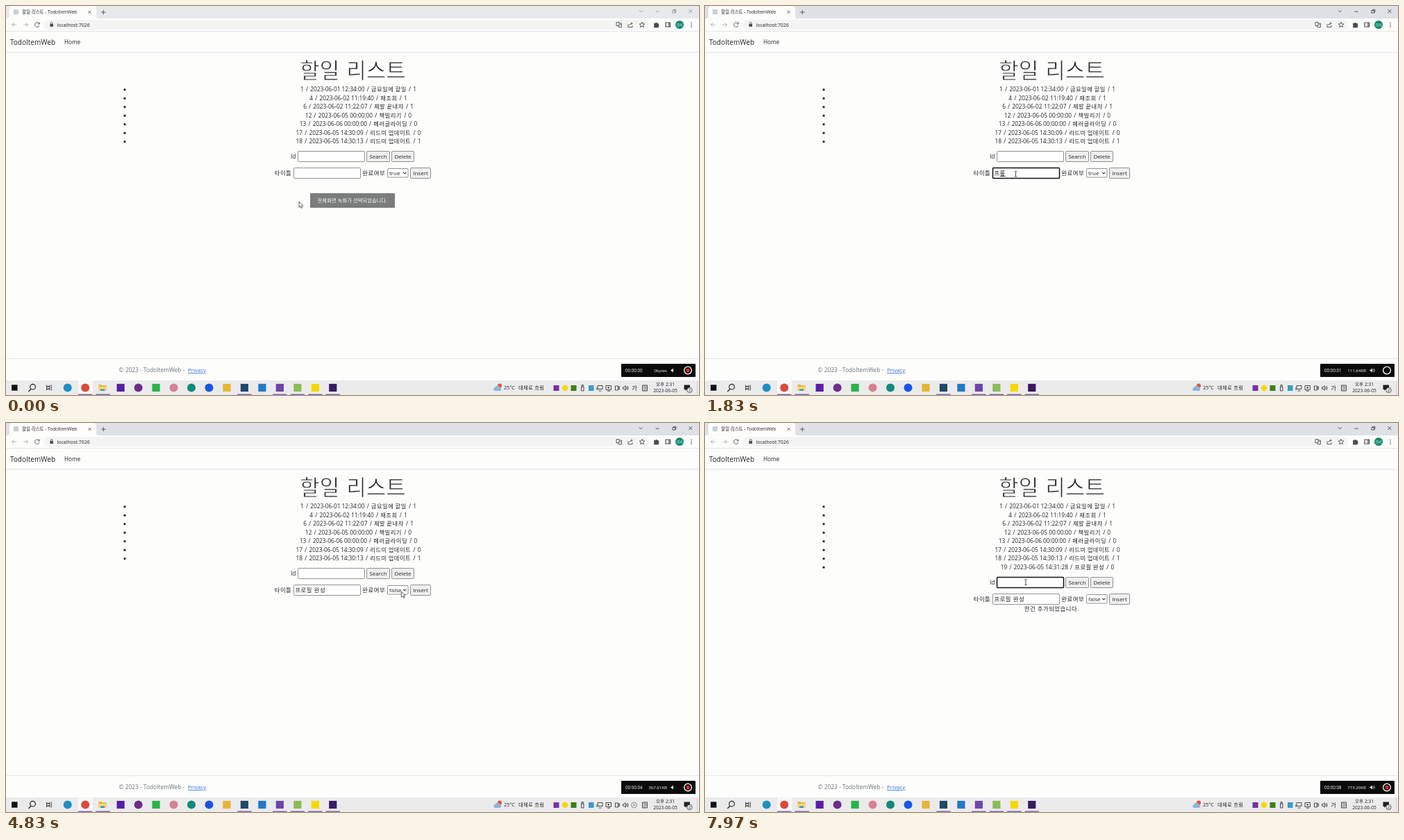
An HTML page for the animation above (8 s loop, 998 by 561 pixels).

```html
<!DOCTYPE html>
<html lang="ko">
<head>
<meta charset="utf-8">
<title>할일 리스트</title>
<style>
html, body { margin: 0; width: 100%; height: 100%; overflow: hidden; background: #fdfdfb; }
svg { display: block; width: 998px; height: 561px; }
text { font-family: "Open Sans", "Noto Sans CJK KR", sans-serif; fill: #212529; white-space: pre; }
.ko { font-size: 8.4px; letter-spacing: .5px; }
.row { font-size: 8.3px; text-anchor: middle; }
.row .hangul { letter-spacing: .5px; }
.row .slash { word-spacing: 1px; }
.ui { font-size: 8px; }
.mid { text-anchor: middle; }
/* a background-coloured outline thins the heading strokes */
.heading { font-size: 31px; font-weight: 300; word-spacing: 2px; stroke: #fdfdfb; stroke-width: .8; }
.field { fill: #fff; stroke: #767676; stroke-width: .8; }
.button { fill: #efefef; stroke: #767676; stroke-width: .8; }
.focus .field { stroke: #101010; stroke-width: 1.5; }
.line { fill: none; stroke: #4a4d51; stroke-width: .9; }
.caption { fill: none; stroke: #333; stroke-width: .8; }
.white { fill: #fff; }
</style>
</head>
<body>
<svg viewBox="0 0 998 561">
  <defs>
    <clipPath id="partial"><rect width="998" height="249"/></clipPath>
  </defs>
  <rect width="998" height="561" fill="#fdfdfb"/>

  <!-- browser window -->
  <rect id="strip" width="998" height="18"/>
  <path d="M2 18Q5 18 5 14V4Q5 0 9 0H126Q130 0 130 4V14Q130 18 133 18Z" fill="#fdfdfb"/>
  <rect x="11" y="5" width="7" height="7" fill="#c5d0d8"/>
  <text x="23" y="11.2" font-size="6.5">할일 리스트 - TodoItemWeb</text>
  <path class="line" d="M118.5 6.8l4 4m0-4l-4 4M137 9h6.5m-3.25-3.25v6.5"/>
  <g id="captions" class="caption">
    <path d="M911.8 6.2l2.4 2.4 2.4-2.4M935.5 8h5M960 6.5h3.6v3.6h-3.6zM961.2 6.5v-1.3h3.6v3.6h-1.2M983.3 5l5 5m0-5l-5 5"/>
  </g>
  <rect x="54" y="20" width="872" height="14" rx="7" fill="#f3f4f3"/>
  <path class="line" stroke-opacity=".45" d="M15 27H8.5m3-3l-3 3 3 3M25 27h6.5m-3-3l3 3-3 3"/>
  <path class="line" d="M47.6 25.2A3.3 3.3 0 1 0 48 28M48.2 23.3v2.6h-2.6"/>
  <rect x="63.4" y="26" width="4.6" height="3.8" fill="#4a4d51"/>
  <path class="line" d="M64.4 26v-1.2a1.3 1.3 0 0 1 2.6 0V26"/>
  <text x="73.5" y="29.6" font-size="7">localhost:7026</text>
  <g class="line">
    <path d="M879 23.5h4v5h-4zM883 25h3.4v5.6h-4.2l-1-2M884 27h1.6M896 26v4.5h6V28M898 28q0-3 4-3m-1.7-1.7l1.9 1.7-1.9 1.7"/>
    <path d="M916 23.2l1.1 2.6 2.8.2-2.2 1.8.7 2.8-2.4-1.5-2.4 1.5.7-2.8-2.2-1.8 2.8-.2z"/>
    <path d="M950 24h6.5v6H950zM954.8 24v6" stroke-width="1.2"/>
  </g>
  <path d="M933 25h2.2a1.3 1.3 0 0 1 2.6 0h2v2a1.3 1.3 0 0 1 0 2.4v1.8H933v-2a1.2 1.2 0 0 0 0-2z" fill="#4a4d51"/>
  <circle cx="970" cy="27" r="6" fill="#128a6c"/>
  <text class="white mid" x="970" y="28.7" font-size="4.4">민서</text>
  <g fill="#4a4d51"><circle cx="987" cy="24.5" r=".8"/><circle cx="987" cy="27.2" r=".8"/><circle cx="987" cy="29.9" r=".8"/></g>
  <path d="M0 36.5H998" stroke="#e3e4e6"/>

  <!-- page -->
  <path d="M0 66.5H998" stroke="#e6e8ea"/><path d="M0 67.8H998" stroke="#f6f6f5" stroke-width="1.6"/>
  <text x="6" y="55.5" font-size="10">TodoItemWeb</text>
  <text x="84" y="54.6" font-size="8.2">Home</text>
  <text class="heading mid" x="499.5" y="103.8">할일 리스트</text>
  <g id="content">
    <g id="list"></g>
    <g id="form">
      <g id="idField">
        <text x="410" y="220" font-size="8.3">Id</text>
        <rect class="field" x="420.5" y="209.5" width="96" height="15" rx="1"/>
      </g>
      <rect class="button" x="519.5" y="209.5" width="33" height="15" rx="1.3"/>
      <text class="ui mid" x="536" y="220">Search</text>
      <rect class="button" x="555.5" y="209.5" width="32" height="15" rx="1.3"/>
      <text class="ui mid" x="571.5" y="220">Delete</text>
      <g id="titleField">
        <text class="ko" x="386.7" y="244.2">타이틀</text>
        <rect class="field" x="414.5" y="233.5" width="96" height="15" rx="1"/>
      </g>
      <text class="ko" x="416.4" y="244.2"><tspan id="typed"></tspan><tspan id="composing" text-decoration="underline"></tspan></text>
      <text class="ko" x="513.3" y="244.2">완료여부</text>
      <rect class="field" x="549.5" y="234.5" width="29.5" height="12.5" rx="1"/>
      <text id="choice" class="ui" x="552" y="244"></text>
      <path d="M572.2 239.8l2 2 2-2" fill="none" stroke="#222" stroke-width="1.1"/>
      <rect class="button" x="582.5" y="233.5" width="29" height="15" rx="1.3"/>
      <text class="ui mid" x="597" y="244">Insert</text>
      <path id="caret" stroke="#222" stroke-width=".7"/>
    </g>
    <text id="message" class="ko mid" x="499.3" y="270.6">한건 추가되었습니다.</text>
  </g>
  <path d="M0 508.5H998" stroke="#e3e5e8"/>
  <text x="162.5" y="528" font-size="8.4" style="fill:#6c757d">© 2023 - TodoItemWeb -</text>
  <text x="262" y="528" font-size="8" style="fill:#2f6fd6" text-decoration="underline">Privacy</text>

  <g id="toast">
    <rect x="438" y="270" width="122" height="21" rx="1" fill="#7b7c7c"/>
    <text class="white mid" x="499" y="282.8" font-size="7.2" letter-spacing=".15">전체화면 녹화가 선택되었습니다.</text>
  </g>

  <!-- recorder -->
  <rect x="886" y="516" width="107" height="19" rx="1" fill="#0b0b0c"/>
  <text id="clock" class="white" x="892" y="527.8" font-size="6.2"></text>
  <text id="size" class="white" x="952" y="527.8" font-size="6.1" text-anchor="end"></text>
  <path d="M957 525.5l4-2.7v5.4z" fill="#fff"/>
  <path id="sound" d="M962 523.6q1.4 1.9 0 3.8M963.4 522.8q2 2.7 0 5.4" fill="none" stroke="#fff" stroke-width=".6"/>
  <circle cx="982" cy="525.5" r="5.4" fill="none" stroke="#fff" stroke-width="1.3"/>
  <rect id="rec" x="979.6" y="523.1" width="4.8" height="4.8" rx=".6" fill="#e02430"/>

  <!-- taskbar -->
  <rect y="540" width="998" height="21" fill="#ebebec"/>
  <rect x="104" y="540" width="21" height="21" fill="#f8f8f8"/>
  <g id="apps"></g>
  <g fill="none" stroke="#222">
    <circle cx="38.6" cy="549.2" r="3.8" stroke-width="1.2"/><path d="M36 552.2l-3.6 3.8" stroke-width="1.3"/>
    <path d="M58.5 546.5v2h4.5v-2M58.5 554.5v-2h4.5v2M58.5 549h4.5v3h-4.5zM65.3 546.5v8" stroke-width=".8"/>
  </g>
  <path d="M133.5 546h4l1 1.3h6V555h-11z" fill="#e9b23c"/><path d="M133.5 549h11v6h-11z" fill="#f7d774"/><path d="M136 552.5h6V555h-6z" fill="#3e90d0"/>
  <circle cx="711" cy="547.5" r="3" fill="#e8503a"/>
  <path d="M704 555a2.6 2.6 0 0 1 .3-5 3.5 3.5 0 0 1 6.5-.6 2.9 2.9 0 0 1 .6 5.6z" fill="#8fb4d8"/>
  <text x="717" y="553.2" font-size="7.2">25°C</text>
  <text x="738" y="553.2" font-size="7.3" letter-spacing=".3">대체로 흐림</text>
  <rect x="788.5" y="547" width="8" height="8" fill="#7730a6"/><circle cx="805" cy="551" r="4.2" fill="#f4d900"/>
  <rect x="813.5" y="547" width="8" height="8" fill="#3f7d16"/><rect x="839" y="547" width="7.5" height="8" fill="#3a9bc8"/>
  <g fill="none" stroke="#222" stroke-width=".8">
    <path d="M828.5 549h3.5v6h-3.5zM829.2 549v-2.5h2V549M852 547.5h7v5h-7zM853.5 555h4M851 550v4M864 547.5h7.5v6H864zM866 555.3h4M867.7 549v3m-1.5-1.5h3M877.5 548h4v6h-4zM881.5 550l2-1.2v4l-2-1.2"/>
    <path d="M888.5 549.7h1.5l2.2-2v6.6l-2.2-2h-1.5zM893.6 549.4q1.2 1.6 0 3.2M895 548q2.2 3 0 6"/>
    <path d="M916.5 547h7v8h-7z"/>
    <g id="imeOff" stroke="#777"><circle cx="904.5" cy="551" r="4"/><path d="M902.7 549.2l3.6 3.6m0-3.6l-3.6 3.6"/></g>
  </g>
  <text id="imeOn" class="mid" x="905" y="554" font-size="8.4">가</text>
  <text class="mid" x="920" y="553.2" font-size="6">한</text>
  <text class="mid" x="949.5" y="548" font-size="6.6">오후 2:31</text>
  <text class="mid" x="949.5" y="557.4" font-size="6.6">2023-06-05</text>
  <path d="M976.5 546.5h8.5v6.5h-5l-1.8 2V553h-1.7z" fill="#222"/><circle cx="984.5" cy="554" r="3.7" fill="#ebebec" stroke="#222" stroke-width=".7"/>
  <text class="mid" x="984.5" y="556" font-size="5.6">2</text>
  <path d="M995.5 541v20" stroke="#c9c9cc" stroke-width=".7"/>

  <g id="pointer" stroke-linejoin="round">
    <path id="arrow" d="M0 0V8.4L1.9 6.7 3.2 9.5 4.5 8.9 3.3 6.2H5.8Z" fill="#fff" stroke="#222" stroke-width=".7"/>
    <path id="beam" d="M-1.8-4Q0-4 0-3Q0-4 1.8-4M0-3V3M-1.8 4Q0 4 0 3Q0 4 1.8 4" fill="none" stroke="#222" stroke-width=".8"/>
    <path id="hand" d="M-1 .8Q0-.8 1 .8V4.4L4.4 5.2Q5.4 5.6 5.2 7L4.4 11H-.4L-3 7.2Q-2.7 5.8-1 7Z" fill="#fff" stroke="#222" stroke-width=".7"/>
  </g>
</svg>
<script>
const LOOP = 8000, ROW = 12.5, FORM_SHIFT = 13;
const CLICK_TITLE = 800, TYPE_START = 1300, KEY_MS = 120, BLUR = 4350, CHOOSE = 4750,
      INSERT = 5540, REPAINTED = 5630, CLICK_ID = 7450;
const $ = id => document.getElementById(id);
const show = (id, on) => { $(id).style.display = on ? '' : 'none'; };
const put = (id, text) => { if ($(id).textContent !== text) $(id).textContent = text; };

const rows = [
  '1 / 2023-06-01 12:34:00 / 금요일에 할일 / 1',
  '4 / 2023-06-02 11:19:40 / 재조회 / 1',
  '6 / 2023-06-02 11:22:07 / 제발 끝내자 / 1',
  '12 / 2023-06-05 00:00:00 / 책빌리기 / 0',
  '13 / 2023-06-06 00:00:00 / 페러글라이딩 / 0',
  '17 / 2023-06-05 14:30:09 / 리드미 업데이트 / 0',
  '18 / 2023-06-05 14:30:13 / 리드미 업데이트 / 1',
  '19 / 2023-06-05 14:31:28 / 프로필 완성 / 0'
];
const spaced = text => text
  .replace(/ \/ /g, '<tspan class="slash">$&</tspan>')
  .replace(/[가-힣]+/g, '<tspan class="hangul">$&</tspan>');
$('list').innerHTML = rows.map((text, i) => `<g id="row${i}">
  <circle cx="171" cy="${120.7 + i * ROW}" r="1.6" fill="#212529"/>
  <text class="row" x="507.5" y="${123 + i * ROW}">${spaced(text)}</text></g>`).join('');

// Taskbar slots: [slot, shape, colour, running]
const apps = [
  [0, 's', '#111'], [3, 'c', '#1f8fc4'], [4, 'c', '#db4a3a', 1], [5, '', '', 1],
  [6, 's', '#5a1fa4'], [7, 'c', '#6e2c8c'], [8, 's', '#2bb24c'], [9, 'c', '#d8818f'],
  [10, 'c', '#118a78'], [11, 'c', '#1a55e0'], [12, 's', '#e4b638'], [13, 's', '#1f4b68', 1],
  [14, 's', '#2479c4'], [15, 's', '#7044a8', 1], [16, 's', '#8dbb58', 1],
  [17, 's', '#f4d900', 1], [18, 's', '#3b1b60', 1]
];
$('apps').innerHTML = apps.map(([slot, shape, color, running]) => {
  const x = 12.3 + slot * 25.47, r = slot ? 5.6 : 4.2;
  const icon = shape === 'c' ? `<circle cx="${x}" cy="550.5" r="6" fill="${color}"/>`
    : shape ? `<rect x="${x - r}" y="${550.5 - r}" width="${2 * r}" height="${2 * r}" fill="${color}"/>` : '';
  return icon + (running ? `<rect x="${x - 10.2}" y="559.6" width="20.4" height="1.4" fill="#7b61b5"/>` : '');
}).join('');

// Text before the composed syllable, then the syllable, after each key press
const keys = ['|ㅍ', '|프', '|플', '프|로', '프|롶', '프로|피', '프로|필', '프로필 |',
  '프로필 |ㅇ', '프로필 |오', '프로필 |와', '프로필 |완', '프로필 완|ㅅ', '프로필 완|서', '프로필 완|성'];
const sizes = ['0bytes', '111.64KB', '276.73KB', '322.15KB', '367.61KB', '474.53KB', '661.31KB', '717.28KB', '773.20KB'];

const path = [
  [0, 422, 282], [250, 422, 282], [750, 447.5, 242.3], [3350, 447.5, 242.3], [3850, 580.3, 252.7],
  [4000, 580.3, 252.7], [4300, 566, 243], [4750, 566, 243], [5150, 597.7, 241.5], [5750, 597.7, 241.5],
  [6350, 561, 233], [6900, 561, 233], [7400, 462, 229.7], [LOOP, 462, 229.7]
];
function pointerAt(t) {
  const i = path.findIndex((p, k) => k && t <= p[0]);
  const [t0, x0, y0] = path[i - 1], [t1, x1, y1] = path[i];
  const u = (t - t0) / (t1 - t0), e = u * u * (3 - 2 * u);
  return [x0 + (x1 - x0) * e, y0 + (y1 - y0) * e];
}

function drawPointer(t) {
  const [x, y] = pointerAt(t);
  $('pointer').setAttribute('transform', `translate(${x} ${y})`);
  const beam = t < INSERT ? x > 414 && x < 511 && y > 233 && y < 249
                          : x > 420 && x < 517 && y > 222 && y < 238;
  const hand = t > REPAINTED && x > 519 && x < 588 && y < 238;
  show('beam', beam);
  show('hand', hand);
  show('arrow', !beam && !hand);
}

function drawForm(t) {
  const added = t >= INSERT, partial = added && t < REPAINTED;
  const inTitle = t >= CLICK_TITLE && t < BLUR, inId = t >= CLICK_ID;
  show('row7', added);
  show('message', added);
  $('form').setAttribute('transform', `translate(0 ${added ? FORM_SHIFT : 0})`);
  partial ? $('content').setAttribute('clip-path', 'url(#partial)') : $('content').removeAttribute('clip-path');
  $('titleField').classList.toggle('focus', inTitle);
  $('idField').classList.toggle('focus', inId);
  put('choice', t < CHOOSE ? 'true' : 'false');

  const key = Math.min(Math.floor((t - TYPE_START) / KEY_MS), keys.length - 1);
  const [done, composing] = key < 0 ? ['', ''] : keys[key].split('|');
  put('typed', inTitle ? done : done + composing);
  put('composing', inTitle ? composing : '');

  const since = t - (inId ? CLICK_ID : CLICK_TITLE);
  show('caret', (inId || (inTitle && key < 0)) && since % 1000 < 500);
  $('caret').setAttribute('d', inId ? 'M422.8 212.5v9' : 'M416.9 236.5v9');
}

function draw(t) {
  const focused = t >= CLICK_TITLE, typable = t < BLUR || t >= CLICK_ID;
  $('strip').setAttribute('fill', focused ? '#dee1e6' : '#e7eaed');
  $('captions').style.opacity = focused ? 1 : .5;
  $('toast').style.opacity = Math.max(0, Math.min(1, (600 - t) / 300));
  drawForm(t);
  drawPointer(t);

  const second = Math.floor((t + 50) / 1000);
  put('clock', '00:00:0' + second);
  put('size', sizes[second]);
  show('rec', second % 2 === 0);
  show('sound', (t > TYPE_START && t < 3200) || t > CLICK_ID);
  show('imeOn', typable);
  show('imeOff', !typable);
}

const start = performance.now();
function tick() {
  draw((performance.now() - start) % LOOP);
  requestAnimationFrame(tick);
}
tick();
</script>
</body>
</html>
```
